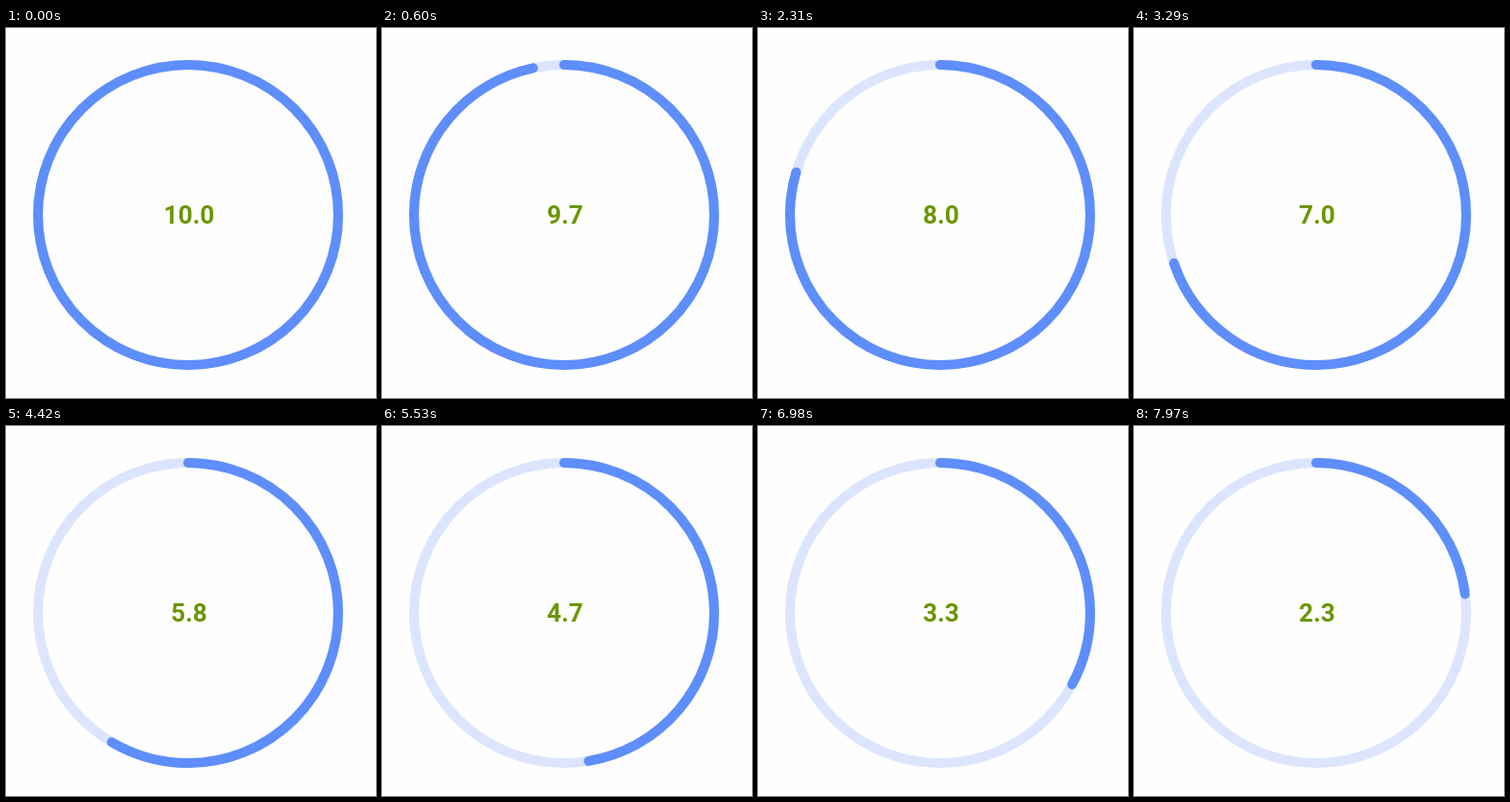
Write an HTML page with a canvas that moves like this. It is 382x382 px and loops after 7.99 s.

```html
<!DOCTYPE html>
<html lang="en">
<head>
<meta charset="utf-8">
<title>Countdown ring</title>
<style>
  html, body { margin: 0; width: 100%; height: 100%; overflow: hidden; background: #fefefe; }
  canvas { display: block; width: 382px; height: 382px; }
</style>
</head>
<body>
<canvas id="stage"></canvas>
<script>
const SIZE = 382;
const LOOP = 7990;
const START = 10;
const HOLD = 270; // ms at full before counting down
const RING = { x: 188, y: 193, r: 155, width: 10 };

const canvas = document.getElementById('stage');
const ctx = canvas.getContext('2d');
const ratio = window.devicePixelRatio || 1;
canvas.width = canvas.height = Math.round(SIZE * ratio);
ctx.scale(ratio, ratio);

function drawArc(share, color) {
  const top = -Math.PI / 2;
  ctx.beginPath();
  ctx.arc(RING.x, RING.y, RING.r, top, top + share * Math.PI * 2);
  ctx.strokeStyle = color;
  ctx.stroke();
}

function draw(ms) {
  const left = START - Math.max(0, ms - HOLD) / 1000;

  ctx.fillStyle = '#fefefe';
  ctx.fillRect(0, 0, SIZE, SIZE);

  ctx.lineWidth = RING.width;
  ctx.lineCap = 'round';
  drawArc(1, '#dce5fd');
  drawArc(left / START, '#5e8efb');

  ctx.font = 'bold 26px Roboto, sans-serif';
  ctx.textAlign = 'center';
  ctx.textBaseline = 'alphabetic';
  ctx.fillStyle = '#6a9604';
  ctx.fillText(left.toFixed(1), 189, 202);
}

const began = performance.now();
function tick() {
  draw((performance.now() - began) % LOOP);
  requestAnimationFrame(tick);
}
tick();
</script>
</body>
</html>
```
